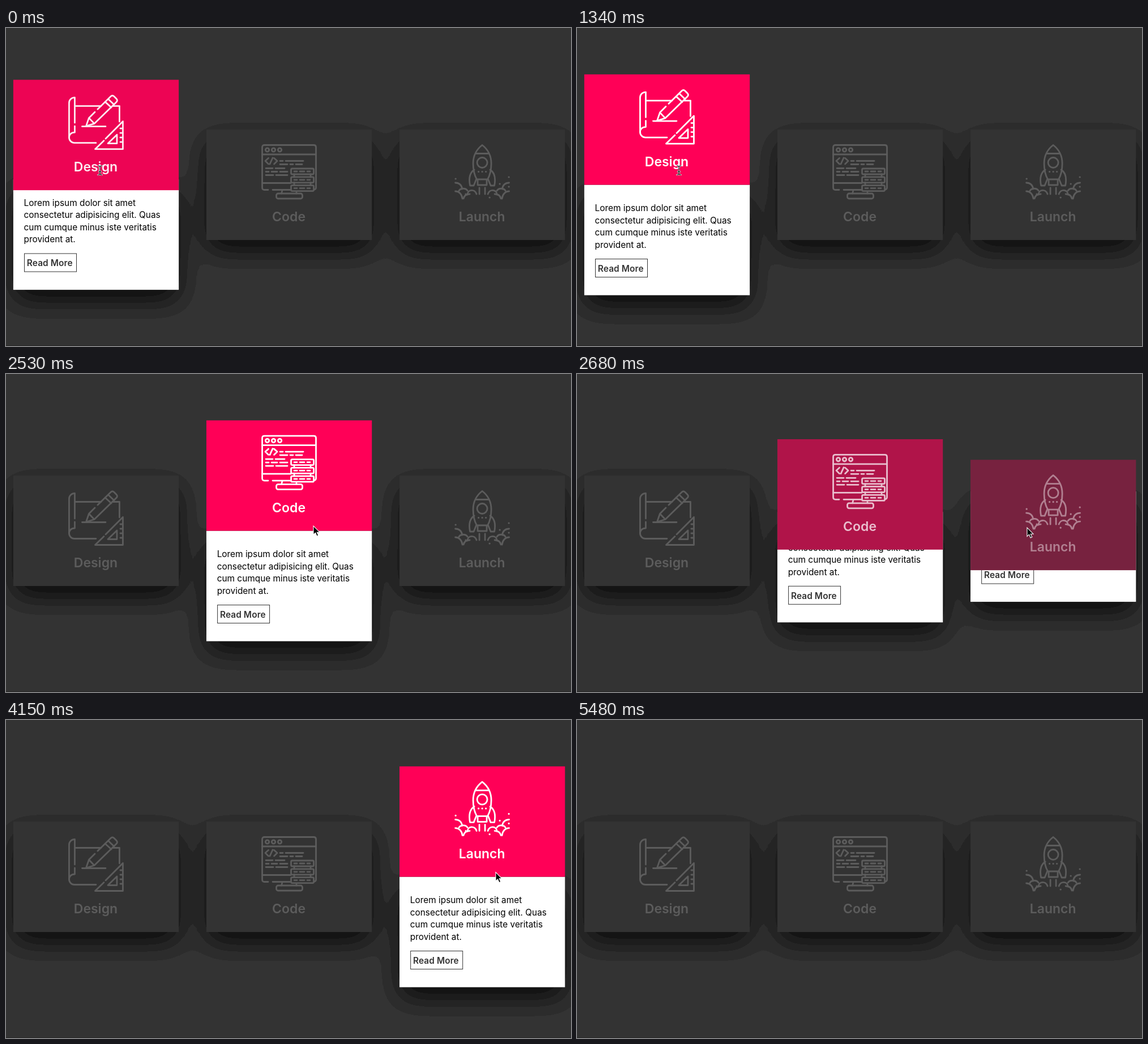
Animation, 998 px wide and 561 px high, one loop 6080 ms. Source, as an HTML page:

```html
<!DOCTYPE html>
<html lang="en">
<head>
<meta charset="utf-8">
<title>Hover cards</title>
<style>
  html, body { margin: 0; width: 100%; height: 100%; overflow: hidden; background: #333; }
  svg { display: block; width: 100vw; height: 100vh; font-family: Inter, "Noto Sans", sans-serif; }
  .icon { fill: none; stroke: #fff; stroke-width: 2.8; stroke-linecap: round; stroke-linejoin: round; }
  .dots { stroke-width: 3.2; }
  .title { font-size: 23px; font-weight: 600; fill: #fff; text-anchor: middle; }
  .body { font-size: 15.4px; fill: #000; }
  .button { font-size: 15.4px; font-weight: 600; letter-spacing: .1px; fill: #333; }
</style>
</head>
<body>
<svg id="stage" viewBox="0 0 998 561">
  <defs>
    <filter id="blur" filterUnits="userSpaceOnUse" x="-150" y="-100" width="1300" height="800">
      <feGaussianBlur stdDeviation="24.4"/>
    </filter>
    <filter id="bands" filterUnits="userSpaceOnUse" x="-150" y="-100" width="1300" height="800">
      <feComponentTransfer>
        <feFuncA type="discrete" tableValues="0 .137 .137 .29 .29 .44 .44 .6 .6 .74 .74 .74 .74 .74"/>
      </feComponentTransfer>
    </filter>

    <g id="design" class="icon">
      <path d="M11.5 50V5.5C6 5.5 1.5 9.5 1.5 15V76A9.5 9.5 0 0 0 11 85.5H49"/>
      <path d="M11.5 56V67C5 67 1.5 71 1.5 76M11.5 20.5H58M79 20.5H90.5V48"/>
      <path d="M47 31L36.5 41.5L31.5 56L46 51.5L85 13.5Q88 10.5 85 7.5L81 3.5Q78 .5 75 3.5L52 26M36.5 41.5L46 51.5M65 13L76 23M70.5 8L81 18"/>
      <path d="M24.5 56.5H66M63 81.5L47.5 96.5H96.5V47.5L66 78M70 86.5H86V71Z"/>
      <path d="M92 60h4M92 68h4M92 76h4M92 84h4"/>
    </g>

    <g id="code" class="icon">
      <path d="M12 80.5H5.5Q1.5 80.5 1.5 76.5V5.5Q1.5 1.5 5.5 1.5H92.5Q96.5 1.5 96.5 5.5V76.5Q96.5 79 94 80"/>
      <path d="M1.5 18H96.5M1.5 68.5H52M20 80.5H52M37 81L35.5 87M62 84.5V87"/>
      <circle cx="10.5" cy="10" r="3.2"/><circle cx="21.5" cy="10" r="3.2"/><circle cx="32.5" cy="10" r="3.2"/>
      <path d="M12.5 24.5L7 29.5L12.5 35M20 24L15 35M22.5 24.5L28 29.5L22.5 35"/>
      <path d="M33 29.5h5M43 29.5H74M33 35.5h13M51 35.5h5M61 35.5h11"/>
      <path d="M8 42.5H20M25 42.5H41M8 48.5h5M18 48.5h10M33 48.5H46M8 54.5H21M26 54.5H46"/>
      <path d="M58 53V58M87 53V58M58 67.5V72.5M87 67.5V72.5"/>
      <g id="server"><rect x="52.5" y="43" width="40" height="10" rx="2"/><path d="M58 48h5M68 48h8M81 48h5"/></g>
      <use href="#server" y="14.8"/><use href="#server" y="29.6"/>
      <rect x="26.5" y="87" width="46" height="9" rx="3"/>
    </g>

    <g id="launch" class="icon">
      <path d="M49 1.5C38 10 33 22 33 34C33 47 36 56 39.5 62H58.5C62 56 65 47 65 34C65 22 60 10 49 1.5Z"/>
      <path d="M38 16.5H60M41 62.5V72H57V62.5"/>
      <circle cx="49" cy="32.5" r="9"/>
      <g id="side">
        <path d="M35 45C27 50 25 60 27.5 73H34L38.5 62M44 77V88"/>
        <path d="M1.5 68C8 68 13 72 13.5 79M8 82C11 77 20 77 23 82M23 89C23 80 36 78 39 88M1.5 83C8 83 13 88 14 96M27 88C21 88 17 91 16 96"/>
      </g>
      <use href="#side" transform="matrix(-1 0 0 1 98 0)"/>
      <path class="dots" d="M42.5 48.5h.1M49 48.5h.1M55.5 48.5h.1M2 61h.1M96 58h.1M80 70h.1M96 75h.1M62 94h.1M20 88h.1"/>
    </g>

    <path id="ibeam" d="M-3.5 -8Q0 -8 0 -5.5Q0 -8 3.5 -8M0 -5.5V5.5M-3.5 8Q0 8 0 5.5Q0 8 3.5 8M-2 2.5H2"/>
  </defs>

  <rect width="998" height="561" fill="#333"/>
  <g id="shadows" filter="url(#bands)"></g>
  <g id="cards"></g>
  <rect y="560" width="998" height="1" fill="#262626"/>

  <g id="beam" fill="none" stroke-linecap="round">
    <use href="#ibeam" stroke="#fff" stroke-width="2.4"/>
    <use href="#ibeam" stroke="#000" stroke-width="1.2"/>
  </g>
  <path id="arrow" d="M0 0V15.5L3.6 12.2L6.1 18L8.8 16.8L6.3 11.2H11Z" fill="#000" stroke="#fff" stroke-width="1.1"/>
</svg>
<script>
const LOOP = 6080, FADE = 500, TINT_LEAD = 10;
const WIDTH = 292.3, HEIGHT = 194.8, TOP = 179.2, SHIFT = HEIGHT / 2;
const LINES = ["Lorem ipsum dolor sit amet", "consectetur adipisicing elit. Quas",
  "cum cumque minus iste veritatis", "provident at."];

// Hover begins at `enter` and ends at `leave` (ms).
const CARDS = [
  { id: "design", title: "Design", x: 12.85, enter: -313, leave: 1398 },
  { id: "code", title: "Code", x: 353.95, enter: 1412, leave: 2570 },
  { id: "launch", title: "Launch", x: 695.05, enter: 2582, leave: 4930 },
];

// Moments at which the picture is refreshed.
const TICKS = [0, 150, 290, 1340, 1490, 1630, 1780, 1930, 2530, 2680, 2830, 2970, 3120, 3270, 3420,
  3560, 3700, 3850, 4000, 4150, 4300, 4440, 4590, 4740, 4890, 5030, 5180, 5330, 5480];

// Pointer path: time, x, y.
const PATH = [[0, 166, 251], [290, 179, 251], [1340, 180, 251], [1490, 405, 257], [1630, 489, 262],
  [1930, 541, 268], [2530, 543, 268], [2680, 795, 271], [2830, 838, 270], [2970, 847, 270],
  [3560, 849, 266], [3850, 855, 258], [4300, 870, 274], [4740, 862, 285], [4890, 868, 300]];
const BEAM_END = 1400, POINTER_END = 5000;

const $ = id => document.getElementById(id);
const mix = (a, b, k) => a + (b - a) * k;

function add(parent, tag, attrs, text) {
  const el = document.createElementNS("http://www.w3.org/2000/svg", tag);
  for (const key in attrs) el.setAttribute(key, attrs[key]);
  if (text) el.textContent = text;
  return parent.appendChild(el);
}

// CSS "ease": cubic-bezier(.25, .1, .25, 1)
function ease(u) {
  if (u <= 0) return 0;
  if (u >= 1) return 1;
  const curve = (s, a, b) => 3 * (1 - s) ** 2 * s * a + 3 * (1 - s) * s * s * b + s ** 3;
  let lo = 0, hi = 1;
  for (let i = 0; i < 24; i++) {
    const mid = (lo + hi) / 2;
    if (curve(mid, .25, .25) < u) lo = mid; else hi = mid;
  }
  return curve(lo, .1, 1);
}

function build(card) {
  const size = { width: WIDTH, height: HEIGHT };
  card.shadow = add($("shadows"), "rect", { ...size, x: card.x, "fill-opacity": .8, filter: "url(#blur)" });
  card.lower = add($("cards"), "g", {});
  add(card.lower, "rect", { ...size, fill: "#fff" });
  LINES.forEach((line, i) =>
    add(card.lower, "text", { class: "body", x: 18.7, y: 46.9 + i * 21.45 }, line));
  add(card.lower, "rect", { x: 19.65, y: 130.9, width: 92, height: 32, fill: "none", stroke: "#333" });
  add(card.lower, "text", { class: "button", x: 24, y: 153.2 }, "Read More");

  card.upper = add($("cards"), "g", {});
  card.back = add(card.upper, "rect", size);
  card.content = add(card.upper, "g", {});
  add(card.content, "use", { href: "#" + card.id, x: 97.1, y: 25.8 });
  add(card.content, "text", { class: "title", x: 145.6, y: 161.8 }, card.title);
}

const hover = (card, t) => ease((t - card.enter) / FADE) - ease((t - card.leave) / FADE);

function pose(card, t) {
  const p = hover(card, t), tint = hover(card, t + TINT_LEAD);
  const up = TOP - SHIFT * p, down = TOP + SHIFT * p;
  const rgb = [255, 0, 87].map(c => Math.round(mix(51, c, tint)));
  card.shadow.setAttribute("y", down + 19.5);
  card.lower.setAttribute("transform", `translate(${card.x} ${down})`);
  card.lower.style.display = p > 0 ? "" : "none";
  card.upper.setAttribute("transform", `translate(${card.x} ${up})`);
  card.back.setAttribute("fill", `rgb(${rgb})`);
  card.content.setAttribute("opacity", mix(.2, 1, p));
}

function pointer(t) {
  const next = PATH.findIndex(point => point[0] > t);
  const b = next < 0 ? PATH[PATH.length - 1] : PATH[next];
  const a = next < 0 ? b : PATH[next - 1];
  const k = a === b ? 0 : (t - a[0]) / (b[0] - a[0]);
  const place = `translate(${mix(a[1], b[1], k)} ${mix(a[2], b[2], k)})`;
  const beam = t < BEAM_END;
  $("beam").setAttribute("transform", place);
  $("arrow").setAttribute("transform", place);
  $("beam").style.display = beam ? "" : "none";
  $("arrow").style.display = !beam && t < POINTER_END ? "" : "none";
}

function draw(time) {
  const t = TICKS.filter(tick => tick <= time).pop();
  CARDS.forEach(card => pose(card, t));
  pointer(t);
}

CARDS.forEach(build);
const start = performance.now();
function loop() {
  draw((performance.now() - start) % LOOP);
  requestAnimationFrame(loop);
}
loop();
</script>
</body>
</html>
```
